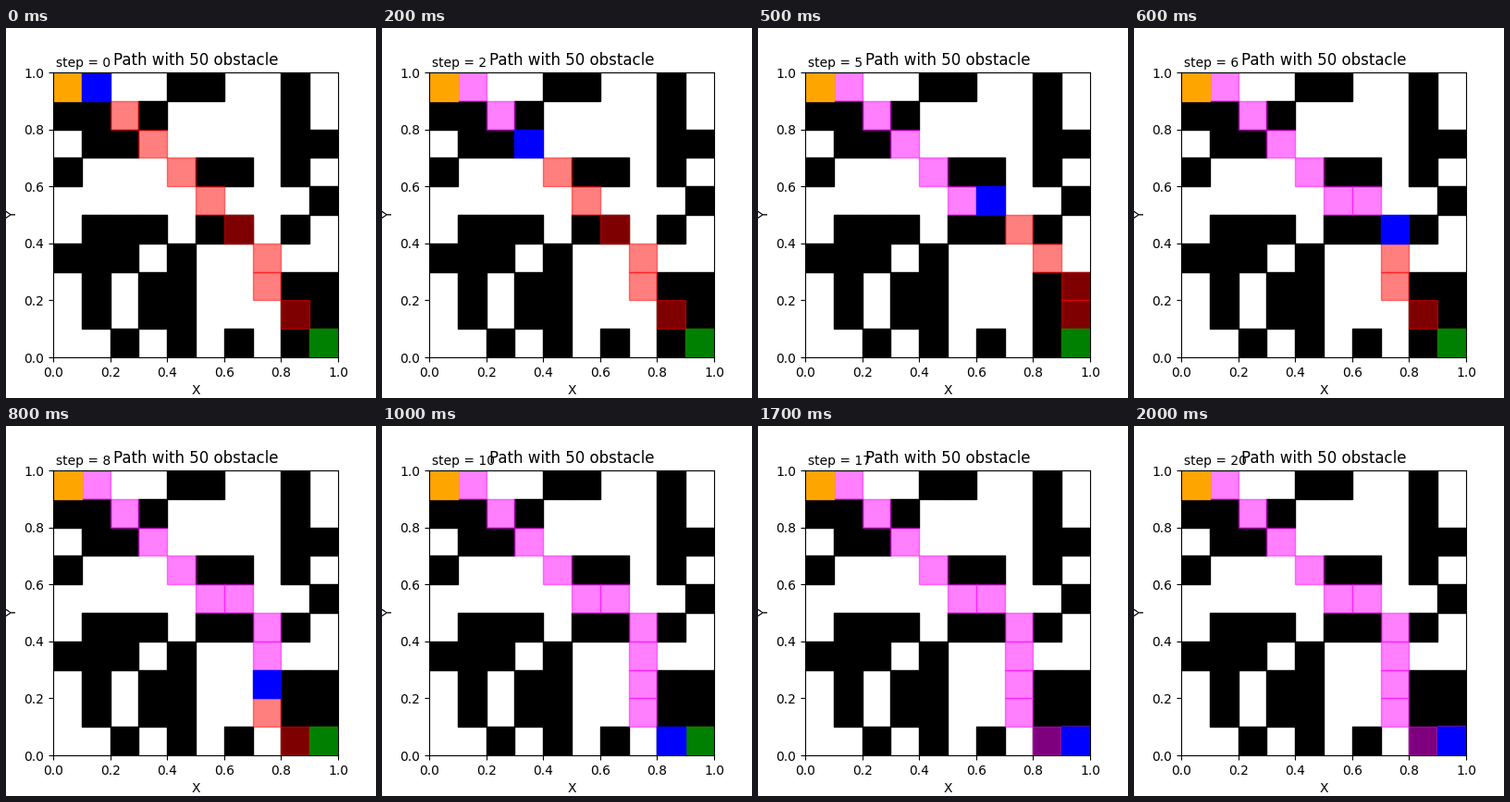
Recreate the animation shown at these times as a matplotlib script. Size 400 by 400 pixels, loop 2.1 s.

```python
import matplotlib.pyplot as plt
from matplotlib.animation import FuncAnimation
from matplotlib.patches import Rectangle

N = 10
STEPS = 21
START, GOAL = (0, 0), (9, 9)

GRID = """
....##..#.
##.#....#.
.##.....##
#....##.#.
.........#
.###.##.#.
###.#.....
.#.##...##
.#.##...##
..#.#.#.#.
""".split()

# Cells are (row, column), counted from the top left.
WALK = [(0, 1), (1, 2), (2, 3), (3, 4), (4, 5), (4, 6),
        (5, 7), (6, 7), (7, 7), (8, 7), (9, 8)]
WALK += [GOAL] * (STEPS - len(WALK))

# Each route replaces the previous one at the step where it is planned.
ROUTES = {
    0: WALK[1:5] + [(5, 6), (6, 7), (7, 7), (8, 8), GOAL],
    3: WALK[4:7] + [(6, 8), (7, 9), (8, 9), GOAL],
    6: [(6, 7), (7, 7), (8, 8), GOAL],
    7: WALK[8:12],
}


def planned(step):
    begun = max(s for s in ROUTES if s <= step)
    return ROUTES[begun][step - begun:]


fig, ax = plt.subplots(figsize=(4, 4), dpi=100)
ax.set_xlim(0, 1)
ax.set_ylim(0, 1)
ax.set_aspect("equal")
ax.set_xlabel("X")
ax.set_ylabel("Y")
ax.set_title("Path with 50 obstacle")
label = ax.text(0.01, 1.02, "", transform=ax.transAxes)


def add_cell(cell, color, z, alpha=None):
    row, col = cell
    size = 1 / N
    return ax.add_patch(Rectangle((col * size, 1 - (row + 1) * size), size, size,
                                  color=color, alpha=alpha, zorder=z))


for r, line in enumerate(GRID):
    for c, mark in enumerate(line):
        if mark == "#":
            add_cell((r, c), "black", 1)
add_cell(START, "orange", 1.6)
add_cell(GOAL, "green", 1.6)

moving = []


def update(step):
    while moving:
        moving.pop().remove()
    trail = [START] + WALK[:step] if step else []
    moving.extend(add_cell(cell, "red", 1.2, 0.5) for cell in planned(step))
    moving.extend(add_cell(cell, "magenta", 1.4, 0.5) for cell in trail)
    moving.append(add_cell(WALK[step], "blue", 1.8))
    label.set_text(f"step = {step}")
    return [*moving, label]


anim = FuncAnimation(fig, update, frames=STEPS, interval=100,
                     init_func=lambda: update(0), repeat=True, repeat_delay=0)
plt.show()
```
